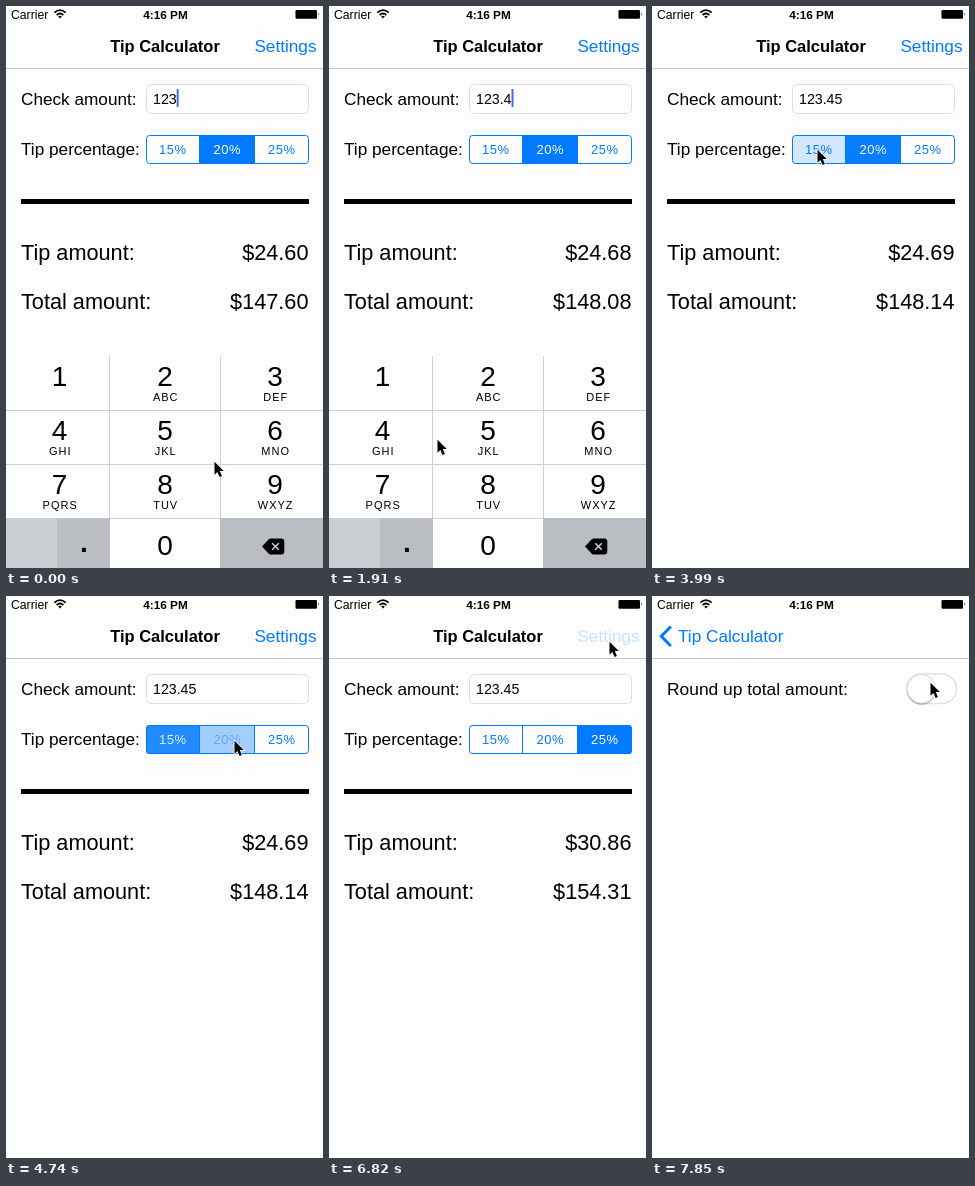
An HTML page that plays this animation: 317 px wide and 562 px high, repeating every 8 s.

```html
<!DOCTYPE html>
<html lang="en">
<head>
<meta charset="utf-8">
<title>Tip Calculator</title>
<style>
html, body { margin: 0; width: 100%; height: 100%; overflow: hidden; background: #fdfdfd; }
svg { display: block; width: 100vw; height: 100vh; }
text { font-family: "Liberation Sans", Arial, sans-serif; font-size: 17.2px; }
.big { font-size: 21.7px; }
.blue { fill: #007aff; }
.mid { text-anchor: middle; }
.end { text-anchor: end; }
.seg { font-size: 13px; letter-spacing: .6px; }
.digit { font-size: 28px; }
.abc { font-size: 11px; letter-spacing: 1px; }
</style>
</head>
<body>
<svg viewBox="0 0 317 562" xmlns="http://www.w3.org/2000/svg">
  <defs>
    <clipPath id="segClip"><rect x="140" y="129" width="163" height="29" rx="3.5"/></clipPath>
    <clipPath id="bodyClip"><rect y="63" width="317" height="499"/></clipPath>
  </defs>
  <rect width="317" height="562" fill="#fdfdfd"/>
  <g clip-path="url(#bodyClip)">
    <g id="calc">
      <text x="15" y="99">Check amount:</text>
      <rect x="140.5" y="78.5" width="162" height="29" rx="5" fill="#fefefe" stroke="#dedede"/>
      <text id="amount" x="147" y="98" style="font-size:14.2px"></text>
      <rect id="caret" y="83" width="2" height="18" fill="#426bf2"/>
      <text x="15" y="149">Tip percentage:</text>
      <g id="segs" clip-path="url(#segClip)"></g>
      <path d="M193.5 130v27M248.5 130v27" stroke="#007aff"/>
      <rect x="140.5" y="129.5" width="162" height="28" rx="3" fill="none" stroke="#007aff"/>
      <g id="segText"></g>
      <rect x="15" y="193" width="288" height="5"/>
      <text class="big" x="15" y="254">Tip amount:</text>
      <text class="big end" id="tip" x="302.5" y="254"></text>
      <text class="big" x="15" y="303">Total amount:</text>
      <text class="big end" id="total" x="302.5" y="303"></text>
    </g>
    <g id="pad"></g>
    <g id="settings">
      <rect y="63" width="317" height="499" fill="#fdfdfd"/>
      <text x="15" y="99" style="font-size:17.4px">Round up total amount:</text>
      <rect x="254.5" y="78" width="50" height="29.5" rx="14.75" fill="#fefefe" stroke="#e2e2e2" stroke-width="1.5"/>
      <circle cx="269.5" cy="94.5" r="14.4" opacity=".22"/>
      <circle cx="269.5" cy="92.8" r="14.3" fill="#fff" stroke="#d2d2d2" stroke-width=".8"/>
    </g>
  </g>
  <path d="M0 62.5H317" stroke="#c4c4c4"/>
  <text id="heading" class="mid" x="159" y="46" font-weight="bold" style="font-size:16.5px">Tip Calculator</text>
  <text id="link" class="blue end" x="310.5" y="46">Settings</text>
  <path id="chevron" d="M18.8 30.5L9.3 40.2L18.8 50" fill="none" stroke="#007aff" stroke-width="3"/>
  <text id="back" class="blue" x="26" y="46">Tip Calculator</text>
  <text x="5" y="13" style="font-size:12.2px">Carrier</text>
  <g fill="none" stroke="#000" stroke-width="1.7">
    <path d="M48.3 6.6Q54 1.6 59.7 6.6M50.6 9Q54 6 57.4 9"/>
    <path d="M54 12.6L52.2 10.4Q54 9 55.8 10.4Z" fill="#000" stroke="none"/>
  </g>
  <text class="mid" x="159.5" y="12.5" font-weight="bold" style="font-size:11.8px">4:16 PM</text>
  <rect x="289.5" y="4" width="21.5" height="8.7" rx="1.2"/>
  <path d="M312.3 6.6q1.6 1.6 0 3.2z"/>
  <path id="cursor" d="M.5 .8V13.8L3.4 11L5.6 16L7.9 15L5.8 10.1H9.8Z" stroke="#fff" stroke-width="1.5" paint-order="stroke"/>
</svg>
<script>
const LOOP = 8000, STEP = 148.15; // the screen refreshes once per STEP
const GREY = '#babdc2', PAPER = '#fdfdfd';
const $ = id => document.getElementById(id);
const clamp = k => Math.min(1, Math.max(0, k));
const ease = k => (k = clamp(k)) * k * (3 - 2 * k);
const money = v => '$' + (v + 1e-6).toFixed(2);
const tint = k => `rgb(${255 * k},${122 + 133 * k},255)`;
const shift = (id, x, y) => $(id).setAttribute('transform', `translate(${x} ${y})`);
const fade = (id, k) => $(id).setAttribute('opacity', k);

function add(parent, tag, attrs, text) {
  const el = document.createElementNS('http://www.w3.org/2000/svg', tag);
  for (const k in attrs) el.setAttribute(k, attrs[k]);
  if (text) el.textContent = text;
  return $(parent).appendChild(el);
}

// Segmented control
const rates = [.15, .2, .25];
const segs = rates.map((rate, n) => {
  const x = 139.3 + 54.5 * n;
  return {
    fill: add('segs', 'rect', { x, y: 129, width: 54.5, height: 29, fill: '#007aff' }),
    text: add('segText', 'text', { x: x + 27.5, y: 148, class: 'seg mid' }, rate * 100 + '%')
  };
});

// Number pad
const keys = {};
const cols = [0, 103.5, 214.5, 317], mids = [53.5, 159, 269];
add('pad', 'rect', { y: 350, width: 317, height: 212, fill: PAPER });
' ABC DEF GHI JKL MNO PQRS TUV WXYZ'.split(' ').forEach((abc, n) => {
  const c = n % 3, y = 350 + 54.2 * Math.floor(n / 3);
  keys[n + 1] = add('pad', 'rect', { x: cols[c], y, width: cols[c + 1] - cols[c], height: 54.2, fill: PAPER });
  add('pad', 'text', { x: mids[c], y: y + 30, class: 'digit mid' }, String(n + 1));
  add('pad', 'text', { x: mids[c] + .7, y: y + 45, class: 'abc mid' }, abc);
});
add('pad', 'path', { d: 'M0 404.5H317M0 458.5H317M0 512.5H317M103.5 350V562M214.5 350V562', stroke: '#cfd0d2' });
add('pad', 'rect', { y: 512.5, width: 51, height: 50, fill: '#cbced3' });
keys['.'] = add('pad', 'rect', { x: 51, y: 512.5, width: 53, height: 50 });
add('pad', 'rect', { x: 214, y: 512, width: 103, height: 50, fill: GREY });
add('pad', 'text', { x: 78, y: 546, class: 'digit mid', 'font-weight': 'bold' }, '.');
add('pad', 'text', { x: 159, y: 549, class: 'digit mid' }, '0');
add('pad', 'path', { d: 'M256 540.5L262.5 533.6Q263.6 532.4 265.2 532.4H275.3Q278.3 532.4 278.3 535.4V545.6Q278.3 548.6 275.3 548.6H265.2Q263.6 548.6 262.5 547.4Z' });
add('pad', 'path', { d: 'M266.2 537.2L272.8 543.8M272.8 537.2L266.2 543.8', stroke: '#d5d7da', 'stroke-width': 1.4 });

// Pointer moves, in steps: from, to, x, y
const moves = [
  [0, 4, 78, 542], [5, 8, 58, 436], [12, 14, 158, 430], [16, 19, 187, 204], [21, 24, 165, 143],
  [28, 31, 228, 144], [32, 34, 268, 144], [41, 45, 280, 45], [49, 53, 278, 86]
];
const presses = [[4, '.'], [9, '4'], [15, '5']];           // step, key
const taps = [[-9, 1], [26.83, 0], [31.64, 1], [35.83, 2]]; // step, segment

function pointer(s) {
  let x = 208, y = 455;
  for (const [from, to, tx, ty] of moves) {
    const k = ease((s - from) / (to - from));
    x += (tx - x) * k;
    y += (ty - y) * k;
  }
  return [x, y];
}

function drawSegments(s) {
  const n = taps.filter(tap => tap[0] <= s).length - 1;
  const [when, now] = taps[n], before = n ? taps[n - 1][1] : now;
  const k = clamp(s - when);
  segs.forEach((seg, j) => {
    const on = j === now ? k : j === before ? 1 - k * k : 0;
    seg.fill.setAttribute('opacity', on);
    seg.text.setAttribute('fill', tint(on < .2 ? 0 : on));
  });
  return rates[k > .3 ? now : before];
}

function drawKeys(s) {
  for (const [when, name] of presses) {
    const held = s >= when && s < when + 2;
    keys[name].setAttribute('fill', held === (name === '.') ? PAPER : GREY);
  }
  const typed = presses.filter(press => press[0] <= s).length;
  $('amount').textContent = '123.45'.slice(0, 3 + typed);
  $('caret').setAttribute('x', 147 + $('amount').getComputedTextLength());
  fade('caret', s < 18 ? 1 : 0);
  shift('pad', 0, 215 * ease((s - 19.7) / 3));
  return parseFloat($('amount').textContent);
}

function drawPush(s) {
  const p = ease((s - 46) / 3);
  shift('calc', -95 * p, 0);
  shift('settings', 318 * (1 - p), 0);
  shift('heading', -80 * p, 0);
  shift('back', 80 * (1 - p), 0);
  fade('heading', 1 - p);
  fade('link', s < 46 ? 1 : .2 * (1 - p));
  fade('back', p);
  fade('chevron', p);
}

function draw(t) {
  const s = Math.floor(t / STEP + .2);
  const sum = drawKeys(s), rate = drawSegments(s);
  $('tip').textContent = money(sum * rate);
  $('total').textContent = money(sum * (1 + rate));
  drawPush(s);
  shift('cursor', ...pointer(s));
}

const start = performance.now();
function tick(now) {
  draw(Math.max(0, now - start) % LOOP);
  requestAnimationFrame(tick);
}
draw(0);
requestAnimationFrame(tick);
</script>
</body>
</html>
```
